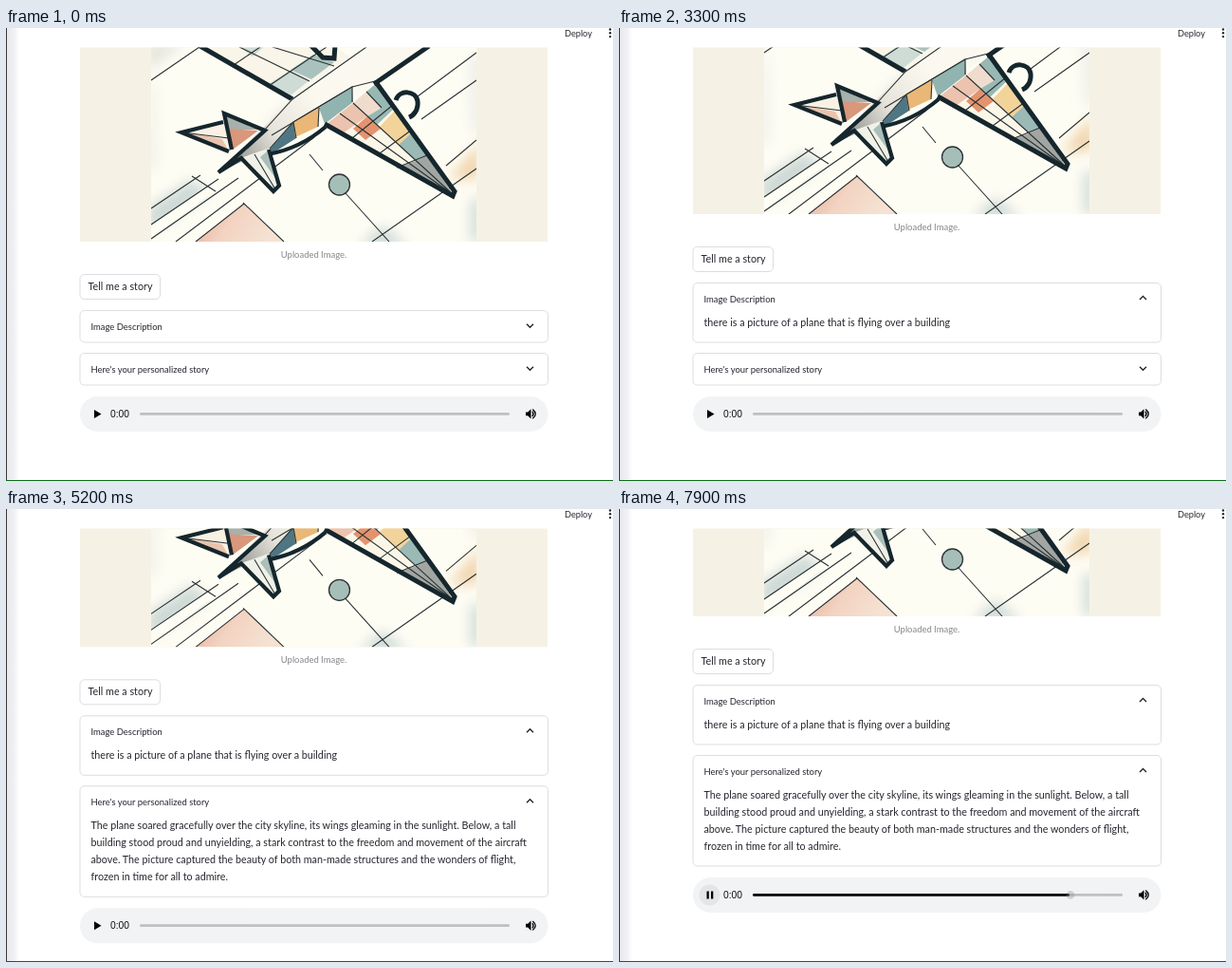
Write an HTML page that moves like this. It is 640x477 px and loops after 8000 ms.

```html
<!DOCTYPE html>
<html lang="en">
<head>
<meta charset="utf-8">
<title>Story page</title>
<style>
  html, body { margin: 0; width: 100%; height: 100%; overflow: hidden; background: #fff; }
  svg { display: block; width: 100vw; height: 100vh; }
  text { font: 10.75px Lato, "Open Sans", sans-serif; fill: #25262e; }
  .small { font-size: 9.45px; }
  .clock { font: 10.3px "Liberation Sans", Arial, sans-serif; fill: #111; }
  .frame { fill: none; stroke: #dddde1; }
  .chevron { fill: none; stroke: #25262e; stroke-width: 1.4; }
  .hot text { fill: #bd4a32; }
  .hot .chevron { stroke: #bd4a32; }
  .hot .edge { stroke: #d08a76; }
  .thin { fill: none; stroke: #2b3233; stroke-width: 1.1; }
  .bold { fill: none; stroke: #15262c; stroke-width: 5; }
  .tail { stroke-width: 4.2; }
</style>
</head>
<body>
<svg viewBox="0 0 640 477" preserveAspectRatio="none">
  <defs>
    <clipPath id="view"><rect y="20.5" width="640" height="456"/></clipPath>
    <clipPath id="art"><rect x="153" y="0" width="343" height="225"/></clipPath>
    <clipPath id="clip1"><rect id="cut1" x="78" y="297" width="494"/></clipPath>
    <clipPath id="clip2"><rect id="cut2" x="78" y="342" width="494"/></clipPath>
    <filter id="soft" x="-50%" y="-50%" width="200%" height="200%"><feGaussianBlur stdDeviation="7"/></filter>
    <linearGradient id="rose" x1="0" y1="0" x2="1" y2=".3">
      <stop stop-color="#e3ab94"/><stop offset=".5" stop-color="#f3d3c2"/><stop offset="1" stop-color="#f5e2d2"/>
    </linearGradient>
    <linearGradient id="hull" gradientUnits="userSpaceOnUse" x1="228" y1="150" x2="330" y2="80">
      <stop stop-color="#7d7f7e"/><stop offset=".3" stop-color="#b4b4af"/>
      <stop offset=".55" stop-color="#e6e4db"/><stop offset="1" stop-color="#fbf9ef"/>
    </linearGradient>
    <linearGradient id="strip"><stop stop-color="#e9e9ed"/><stop offset=".6" stop-color="#f1f1f5"/><stop offset="1" stop-color="#fff"/></linearGradient>
  </defs>
  <rect width="640" height="477" fill="#fff"/>

  <g clip-path="url(#view)"><g id="page">
    <rect x="78" y="0" width="493" height="225" fill="#f5f2e5"/>
    <g clip-path="url(#art)">
      <rect x="153" width="343" height="225" fill="#fefdf4"/>
      <g filter="url(#soft)">
        <path fill="#cbd7d4" d="M150 190L196 160 214 174 150 216z"/>
        <path fill="#e6e6de" d="M145 15H190L150 46z"/>
        <path fill="#ccd9d6" d="M372 230L397 208 425 230zM490 180H502V225H490z"/>
        <path fill="#f0d3aa" d="M466 160L500 120V158z"/>
        <path fill="#dcded8" d="M270 106L312 70 330 62 300 96z"/>
        <path fill="#e6e8e2" d="M153 60H157V150H150zM490 30H500V110H492z"/>
      </g>
      <path fill="#fefdf4" d="M153 207L224 159 246 152 179 202 153 220z"/>
      <path fill="url(#rose)" d="M200 225L251 185 293 225z"/>
      <path class="thin" d="M153 55L204 20M153 190L205 155M153 207L224 159M153 222L245 158M179 225L325 115M196 156L221 172M200 225L251 185M250 184L293 225M320 133L334 150M358 174L404 225M386 225L496 148M434 72L496 26M438 96L496 55M464 145L496 118"/>

      <!-- far wing -->
      <path fill="#f9f5e9" d="M207 18L300 74 362 30 345 18z"/>
      <path fill="#a9c2bd" d="M300 44L324 28 346 36 322 54z"/>
      <path fill="#cfdbd5" d="M246 20H272L260 30zM277 59L300 44 320 55 300 71z"/>
      <path class="thin" d="M240 39L268 20M277 61L338 20M246 20L320 56M281 20L346 40"/>
      <path class="bold" d="M203 18L302 75"/>
      <path class="bold" d="M321 18L334 31 346 32 347 18"/>

      <!-- body -->
      <path fill="url(#hull)" d="M224 152L300 76 376 20H445L393 55 333 97 280 126z"/>
      <path class="thin" d="M272 108L302 75 380 20M280 113L365 62M365 62L393 55"/>
      <path fill="#4f7783" d="M278 127L303 99 306 116 281 132z"/>
      <path fill="#eab776" d="M303 99L330 84 329 104 305 115z"/>
      <path fill="#91b4b0" d="M330 84L365 62 366 78 336 101z"/>
      <path class="thin" d="M303 99L306 116M330 84L329 104M278 127L303 99 365 62V78"/>
      <path class="bold tail" d="M276 133Q310 127 337 104"/>

      <!-- near wing -->
      <path fill="#fbf7e8" d="M338 101L392 57 472 176z"/>
      <path fill="#ecc3ae" d="M338 101L366 79 381 93 355 111z"/>
      <path fill="#f0dccd" d="M366 79L380 67 396 84 381 93z"/>
      <path fill="#e4936f" d="M366 106L381 93 395 106 379 118z"/>
      <path fill="#98b8b4" d="M380 67L392 57 410 84 391 102 381 93 396 84z"/>
      <path fill="#f2d39a" d="M394 104L410 87 428 110 414 123z"/>
      <path fill="#9bb9b5" d="M414 123L428 110 444 134 432 140z"/>
      <path fill="#a2a6a3" d="M412 147L432 140 444 134 472 176z"/>
      <path class="thin" d="M366 79L472 176M352 90L472 176M365 116L408 81M394 132L428 107M412 147L444 134M380 67L396 84"/>
      <path class="bold" d="M336 101L471 177 473 172 390 57"/>
      <path class="bold" d="M388 59L446 19"/>
      <path class="bold" d="M411 76C415 64 432 66 434 77 435 86 430 92 425 94"/>

      <!-- tail -->
      <path fill="#f8f1e4" d="M184 110L232 98 236 130z"/>
      <path fill="#e9c3ae" d="M190 110L228 117 234 128z"/>
      <path fill="#a7b0ab" d="M230 90L270 107 233 107z"/>
      <path fill="#d9977b" d="M234 106L266 108 239 128z"/>
      <path fill="#f0f1e8" d="M247 137L276 127 289 166 282 172z"/>
      <path fill="#a9bfba" d="M268 136L275 130 287 162z"/>
      <path class="thin" d="M186 110L235 116M262 133L284 170"/>
      <path class="bold tail" d="M229 99L185 110 235 130M238 128L230 90 273 108 224 152 248 137 282 172 288 166 277 128"/>

      <circle cx="351.500" cy="165" r="11" fill="#a6beb8" stroke="#2b3233" stroke-width="1.3"/>
    </g>

    <text class="small" x="324.500" y="242" text-anchor="middle" style="fill:#85868c">Uploaded Image.</text>
    <g id="button">
      <rect class="frame edge" x="78" y="259.500" width="84.500" height="26" rx="4.500"/>
      <text x="86.500" y="276">Tell me a story</text>
    </g>

    <g id="head1">
      <text class="small" x="89.500" y="317.500">Image Description</text>
      <path id="arrow1" class="chevron"/>
    </g>
    <g clip-path="url(#clip1)"><text x="89.500" y="343">there is a picture of a plane that is flying over a building</text></g>
    <rect id="box1" class="frame" x="78" y="297.500" width="493.500" rx="4.500"/>

    <g id="second">
      <g id="head2">
        <text class="small" x="89.500" y="362.500">Here's your personalized story</text>
        <path id="arrow2" class="chevron"/>
      </g>
      <g clip-path="url(#clip2)">
        <text x="89.500" y="388">The plane soared gracefully over the city skyline, its wings gleaming in the sunlight. Below, a tall</text>
        <text x="89.500" y="406">building stood proud and unyielding, a stark contrast to the freedom and movement of the aircraft</text>
        <text x="89.500" y="424">above. The picture captured the beauty of both man-made structures and the wonders of flight,</text>
        <text x="89.500" y="442">frozen in time for all to admire.</text>
      </g>
      <rect id="box2" class="frame" x="78" y="342.500" width="493.500" rx="4.500"/>
    </g>

    <g id="player">
      <rect x="78" y="388" width="493.500" height="37" rx="18.500" fill="#f1f3f4"/>
      <circle id="halo" cx="95.500" cy="406.500" r="11" fill="#e3e5e6"/>
      <path id="play" d="M93 402L100.500 406.500 93 411z"/>
      <path id="pause" d="M92.500 402.500h2.300v8h-2.300zM97 402.500h2.300v8h-2.300z"/>
      <text class="clock" x="110" y="410">0:00</text>
      <rect x="141" y="405" width="390" height="2.800" rx="1.400" fill="#bfc0c2"/>
      <rect id="played" x="141" y="405" height="2.800" rx="1.400" fill="#000"/>
      <circle id="thumb" cy="406.400" r="4.300" fill="#8c8d8f"/>
      <path d="M548 404.500h2.200l3.300-3.300v10.400l-3.300-3.300H548z"/>
      <path d="M555 403.700Q557 406.400 555 409.100M555.300 401.600Q561.200 406.400 555.300 411.200" fill="none" stroke="#000" stroke-width="1.300"/>
    </g>
  </g></g>

  <text x="589" y="8.500" style="font-size:9.200px">Deploy</text>
  <g fill="#25262e"><circle cx="637" cy="1.500" r="1.200"/><circle cx="637" cy="5.300" r="1.200"/><circle cx="637" cy="9.100" r="1.200"/></g>
  <rect x="1" width="13" height="476" fill="url(#strip)"/>
  <rect width="1" height="477" fill="#3a3a3a"/>
  <rect y="476" width="640" height="1" fill="#0b6b16"/>
</svg>
<script>
const LOOP = 8000;
const $ = id => document.getElementById(id);
const part = (t, start, length) => Math.min(1, Math.max(0, (t - start) / length));
const easeOut = p => 1 - (1 - p) ** 5;
const smooth = p => p * p * (3 - 2 * p);
const within = (t, from, to) => t >= from && t < to;
const set = (id, name, value) => $(id).setAttribute(name, value);
const down = (id, y) => set(id, 'transform', `translate(0 ${y})`);
const show = (id, on) => set(id, 'opacity', +on);
const hot = (id, on) => $(id).classList.toggle('hot', on);

function expander(n, y, grow) {
  set('box' + n, 'height', 33.5 + grow);
  set('cut' + n, 'height', 33.5 + grow);
  set('arrow' + n, 'd', grow ? `M549 ${y + 1}l3.500-3.500 3.500 3.500` : `M549 ${y - 2.2}l3.500 3.500 3.500-3.500`);
}

function draw(t) {
  const grow1 = 29 * easeOut(part(t, 2566, 500));
  const grow2 = 83 * easeOut(part(t, 4634, 500));
  const scroll = 29 * smooth(part(t, 3000, 300)) + 83 * smooth(part(t, 5000, 350));
  down('page', -scroll);
  down('second', grow1);
  down('player', grow1 + grow2);
  expander(1, 314, grow1);
  expander(2, 359, grow2);

  hot('button', within(t, 1200, 2000));
  hot('head1', within(t, 2200, 3150));
  hot('head2', within(t, 4200, 5150));

  const playing = t >= 6950;
  const length = 334 * part(t, 6950, 950);
  show('play', !playing);
  show('pause', playing);
  show('halo', t >= 6600);
  set('played', 'width', length);
  set('thumb', 'cx', Math.max(145, 142 + length));
  set('thumb', 'opacity', t < 5700 ? 0 : 1 - 0.65 * part(t, 7400, 300));
}

function tick() {
  draw(performance.now() % LOOP);
  requestAnimationFrame(tick);
}
tick();
</script>
</body>
</html>
```
